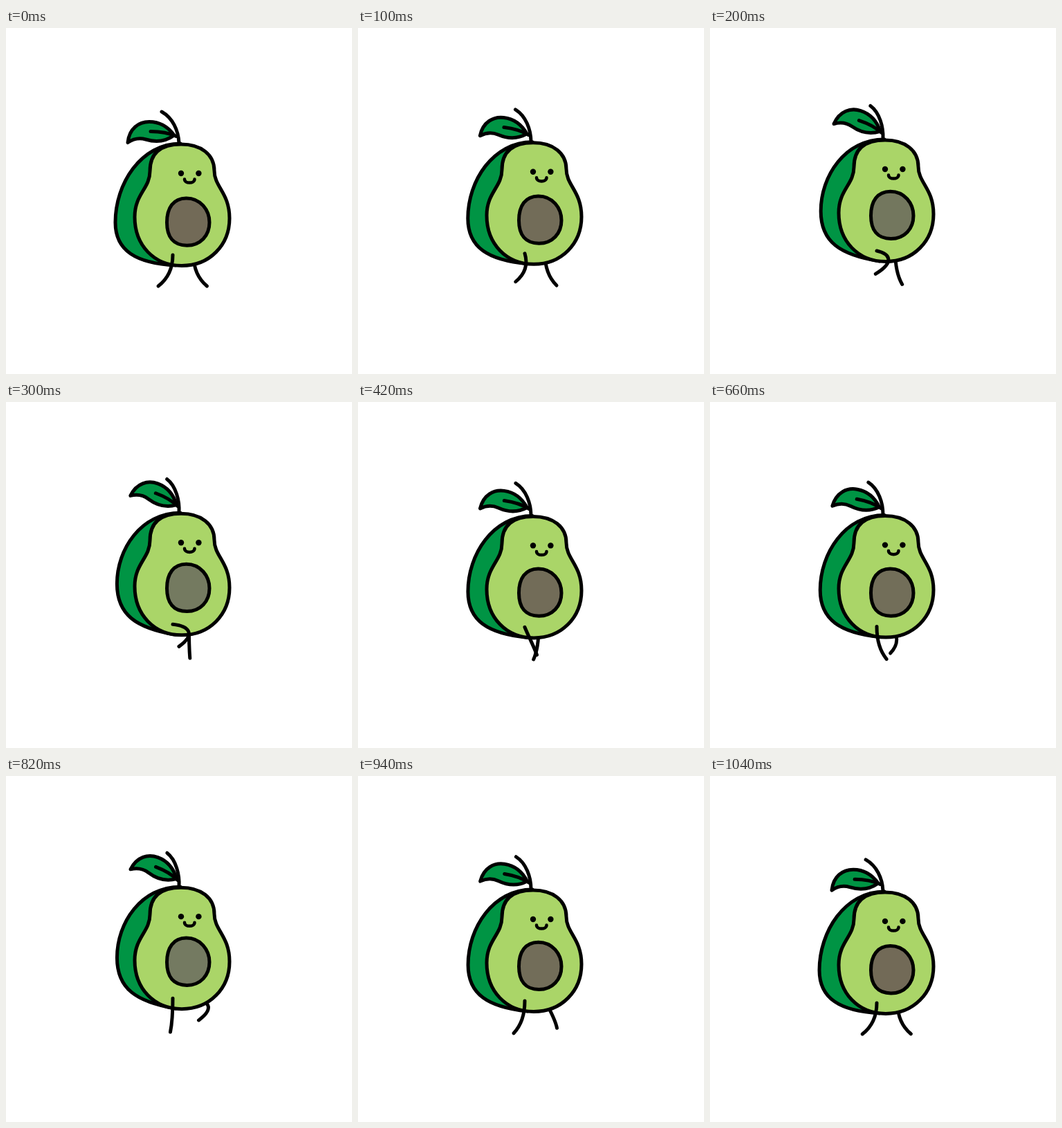
These frames come from a looping animation (500x500 px, 1060 ms). An HTML page:

```html
<!DOCTYPE html>
<html lang="en">
<head>
<meta charset="utf-8">
<title>Walking avocado</title>
<style>
html, body { margin: 0; width: 100%; height: 100%; overflow: hidden; background: #fff; }
svg { display: block; width: 100%; height: 100%; }
</style>
</head>
<body>
<svg viewBox="0 0 500 500" fill="none" stroke="#000" stroke-width="5" stroke-linecap="round" stroke-linejoin="round">
  <path id="backLeg"/>
  <path id="shell" fill="#009444"/>
  <path id="stem"/>
  <g id="leaf">
    <path fill="#009444" d="M176 165.5C178 145 192 135.5 207 135.5C224 135.5 235 144 243 155C228 166 212 164 202 161C192 158 184 160 176 165.5Z"/>
    <path d="M209 149.5C222 149.5 234 151 246 156.5"/>
  </g>
  <g id="body">
    <path fill="#aad568" d="M253 168C282 168 301 183 301 206C301 230 323 238 323 275C323 314 294 343.5 254 343.5C214 343.5 186 314 186 273C186 240 208 232 208 207C208 180 224 168 253 168Z"/>
    <g fill="#000" stroke="none">
      <circle cx="253" cy="210" r="4.2"/>
      <circle cx="278.4" cy="210" r="4.2"/>
    </g>
    <path stroke-width="4.5" d="M258 218.5C258 225.3 272.5 225.3 272.5 218.5"/>
  </g>
  <path id="seed" d="M260.5 246C281 246 294 263 294 281C294 300 281 314.3 261.5 314.3C242 314.3 232.5 302 232.5 281C232.5 260 242 246 260.5 246Z"/>
  <path id="frontLeg"/>
</svg>
<script>
const LOOP = 1060, STEP = LOOP / 2, TICK = 20;
const set = (id, name, value) => document.getElementById(id).setAttribute(name, value);
const bounce = t => Math.sin(Math.PI * t / STEP) ** 2;

// Each leg swings forward for one step, then slides back on the ground for the next.
function leg(t, centre, hip, sway) {
  const phase = t % LOOP / STEP, swinging = phase < 1, lift = bounce(t);
  const stride = swinging ? -Math.cos(Math.PI * phase ** 0.75) : Math.cos(Math.PI * (phase - 1));
  const knee = swinging ? lift ** 1.5 : 0;
  const x = hip + sway * stride, y = 328 - 7 * lift;
  const dx = centre + 20.5 * stride - x;
  const dy = 373 - (swinging ? 20.5 : 3) * lift - y;
  return `M${x} ${y}c${25 * knee} ${0.4 * dy - 11 * knee} ${dx / 3 + 33 * knee} ${0.76 * dy - 11 * knee} ${dx} ${dy}`;
}

// The back half tips upward at its left side as the body rises.
function shell(lift) {
  const top = 167 - 7 * lift, left = 158 + 2.5 * lift;
  return `M252 ${top}C195 ${top} ${left} ${225 - 13 * lift} ${left} ${281 - 19 * lift}`
    + `C${left} ${322 - 15 * lift} 188 ${340 - 14 * lift} 245 ${343 - 7 * lift}`;
}

function stem(lift) {
  return `M250 ${166 - 7 * lift}C${249 + 2 * lift} ${148 - 5 * lift} `
    + `${241 + 5 * lift} ${130 - 9 * lift} ${225 + 8 * lift} ${121 - 10 * lift}`;
}

function draw(t) {
  const lift = bounce(t), tint = lift ** 2;
  set("shell", "d", shell(lift));
  set("stem", "d", stem(lift));
  set("leaf", "transform", `translate(${3 * lift} ${-6 * lift}) rotate(${21 * lift} 245 156)`);
  set("body", "transform", `translate(0 ${-7 * lift})`);
  // The seed trails the body slightly
  set("seed", "transform", `translate(0 ${-12 * bounce(t - 10)})`);
  set("seed", "fill", `rgb(${114 + 2 * tint} ${106 + 17 * tint} ${87 + 10 * tint})`);
  set("frontLeg", "d", leg(t, 240.5, 241, 0));
  set("backLeg", "d", leg(t + STEP, 270, 265.5, 5.5));
}

function tick() {
  draw(Math.floor(performance.now() % LOOP / TICK) * TICK);
  requestAnimationFrame(tick);
}
tick();
</script>
</body>
</html>
```
